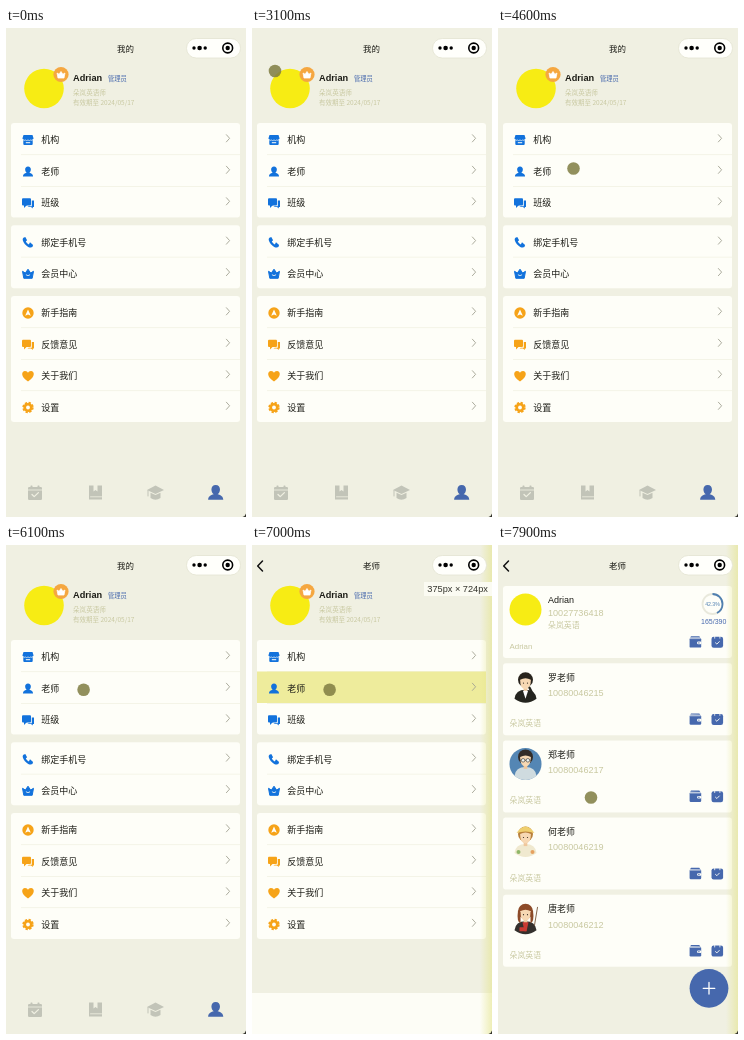
Write an HTML page that moves like this. It is 240 px wide and 489 px high and loops after 8000 ms.

```html
<!DOCTYPE html>
<html lang="zh-CN">
<head>
<meta charset="utf-8">
<title>我的</title>
<style>
html, body { margin: 0; width: 100%; height: 100%; overflow: hidden; background: #f0f0e2; }
svg { display: block; width: 100%; height: 100%; }
text { font-family: "Noto Sans CJK SC", "Noto Sans CJK", "Noto Sans", sans-serif; }
.latin { font-family: "Liberation Sans", Arial, sans-serif; }
</style>
</head>
<body>
<svg id="stage" viewBox="0 0 240 489"></svg>
<script>
const BG = '#f0f0e2', CARD = '#fefef8', INK = '#1c1c16', BLUE = '#4668ad';
const SKY = '#1272dc', ORANGE = '#f6a318', GREY = '#c2c4b8', PALE = '#c8c8a0', YELLOW = '#f7ec14';
const LOOP = 8000;

const text = (x, y, s, size, fill = INK, extra = '') =>
  `<text x="${x}" y="${y + size * 0.37}" font-size="${size}" fill="${fill}" ${extra}>${s}</text>`;
const rect = (x, y, w, h, fill, r = 0, extra = '') =>
  `<rect x="${x}" y="${y}" width="${w}" height="${h}" rx="${r}" fill="${fill}" ${extra}/>`;
const circle = (x, y, r, fill, extra = '') =>
  `<circle cx="${x}" cy="${y}" r="${r}" fill="${fill}" ${extra}/>`;
const path = (d, fill, extra = '') => `<path d="${d}" fill="${fill}" ${extra}/>`;
const line = (d, color, w = 1) =>
  path(d, 'none', `stroke="${color}" stroke-width="${w}" stroke-linecap="round" stroke-linejoin="round"`);
const at = (x, y, body, k = 1) => `<g transform="translate(${x} ${y}) scale(${k})">${body}</g>`;
const group = (id, body) => `<g id="${id}">${body}</g>`;
const LATIN = 'class="latin"', MID = 'text-anchor="middle"', BOLD = 'font-weight="500"';

// Icons are drawn around 0,0
const person = c => path('M0-5.5C2-5.5 3.1-4 3.1-2.2 3.1-.7 2.3.7 1.4 1.3 3.8 1.9 5.5 3 5.5 5.3H-5.5C-5.5 3-3.8 1.9-1.4 1.3-2.3.7-3.1-.7-3.1-2.2-3.1-4-2-5.5 0-5.5Z', c);
const crown = c => path('M-5.5-2.5-2.6-.8 0-4.6 2.6-.8 5.5-2.5 4.2 4.5H-4.2Z', c, `stroke="${c}" stroke-linejoin="round"`);
const icons = {
  shop: rect(-4.7, -2, 9.4, 7, SKY, 1) + path('M-4.5-5H4.5L5.6-1.4Q4.2 1 2.8-.6 1.4 1 0-.6-1.4 1-2.8-.6-4.2 1-5.6-1.4Z', SKY) +
    line('M-4.8-.2Q-3.6.9-2.7 0-1.4 1.1 0 0 1.4 1.1 2.7 0 3.8.9 4.8-.2', CARD, 0.7) + rect(-2.2, 2.2, 4.4, 1, CARD),
  person: at(0, 0, person(SKY), 0.92),
  chat: c => rect(-6, -4.8, 9, 7.4, c, 1) + path('M-4 2V5L-1 2Z', c) +
    path('M3.8-2.4H6V4H4.8V5.6L3 4H-.6L.8 3.2H3.8Z', c),
  phone: path('M-4.6-4.6-2.7-5.2-.9-2-2.2-.7Q-1.2 1.3.8 2.2L2-.1 5.1 2.8 4.4 4.8Q2.6 5.8.2 4.6-4 2.5-5.3-2.2-5.5-3.8-4.6-4.6Z', SKY),
  crown: crown(SKY) + line('M-1.8 1.2Q0 2.8 1.8 1.2', CARD, 0.8),
  guide: circle(0, 0, 5.7, ORANGE) + path('M0-3.4 2.8 2.8 0 1.4-2.8 2.8Z', CARD),
  heart: path('M0 5.5C-8 .3-6.4-5-3-5-1.3-5-.4-4 0-3.2.4-4 1.3-5 3-5 6.4-5 8 .3 0 5.5Z', ORANGE),
  gear: circle(0, 0, 4.6, ORANGE) + circle(0, 0, 4.8, 'none', `stroke="${ORANGE}" stroke-width="1.8" stroke-dasharray="2.3 1.47"`) + circle(0, 0, 1.9, CARD),
};
const calendar = rect(-7, -6, 14, 13, GREY, 1.2) + rect(-4.5, -7.5, 2, 3, GREY, 0.6) + rect(2.5, -7.5, 2, 3, GREY, 0.6) +
  line('M-7-3H7', BG, 0.8) + line('M-3 1.5-.8 3.6 3.4-.4', BG, 1.3);
const schedule = rect(-5.8, -5.2, 11.6, 11, BLUE, 2.2) + line('M-2.6-6V-3.8M2.6-6V-3.8', CARD, 0.8) +
  line('M-1.8 .8-.4 2.1 2-.4', CARD, 0.9);
const wallet = rect(-5.9, -4, 11.6, 9.6, BLUE, 1.2) + path('M-5.4-4.6-4.4-5.8H3.8L4.8-4.4Z', BLUE) +
  line('M-5.2-3.4H4.8', CARD, 0.6) + rect(1.6, -0.4, 4.3, 2.6, CARD, 1) + circle(3.4, 0.9, 0.7, BLUE);

const capsule = rect(180.5, 10.5, 54, 19.5, '#fffffb', 9.7, 'stroke="#e4e4d2" stroke-width=".8"') +
  circle(188, 20, 1.7, '#000') + circle(193.6, 20, 2.3, '#000') + circle(199.2, 20, 1.7, '#000') +
  circle(221.7, 20, 4.9, 'none', 'stroke="#000" stroke-width="1.6"') + circle(221.7, 20, 2.2, '#000');
const title = s => text(119.5, 20.5, s, 8.5, INK, `${MID} ${BOLD}`);

function menuCard(top, rows) {
  let out = rect(5, top, 229, rows.length * 31.5, CARD, 3);
  rows.forEach(([icon, label, pressId], i) => {
    const edge = top + i * 31.5, y = edge + 17;
    if (i) out += rect(15, edge, 219, 0.6, '#eeeedc');
    if (pressId) out += group(pressId, rect(5, edge, 229, 31.5, '#eeec9c'));
    out += at(22, y, icon) + text(35.3, y, label, 9, INK, BOLD) +
      line(`M220.4 ${y - 5.3}l3.2 3.6-3.2 3.6`, '#a3a393', 0.9);
  });
  return out;
}

function minePage() {
  const head = circle(38, 60.5, 19.8, YELLOW) + circle(55, 46.5, 7.6, '#f5a740') + at(55, 46.8, crown('#fff'), 0.72) +
    text(67, 50, 'Adrian', 9.2, INK, 'class="latin" font-weight="700"') +
    text(102, 50.3, '管理员', 6.3, BLUE) +
    text(67, 65, '朵岚英语师', 6.6, PALE) +
    text(67, 75, '有效期至 2024/05/17', 6.5, PALE);
  const cards = [
    [95, [[icons.shop, '机构'], [icons.person, '老师', 'press'], [icons.chat(SKY), '班级']]],
    [197.3, [[icons.phone, '绑定手机号'], [icons.crown, '会员中心']]],
    [268, [[icons.guide, '新手指南'], [icons.chat(ORANGE), '反馈意见'], [icons.heart, '关于我们'], [icons.gear, '设置']]],
  ];
  return head + cards.map(c => menuCard(...c)).join('');
}

const tabs = at(29, 465, calendar) +
  at(89.5, 464.5, path('M-6.5-7H-2V-1L0-2.5 2-1V-7H6.5V7H-6.5Z', GREY) + line('M-5 4.3H6', BG, 0.8)) +
  at(149.5, 464.5, path('M0-7 8.5-2.5 0 1.5-8.5-2.5Z', GREY) + path('M-5 .3 0 2.6 5 .3V5.5Q0 9-5 5.5Z', GREY) + line('M-7.5-2V3.5', GREY)) +
  at(209.7, 464.5, person(BLUE), 1.38);

// Simple portrait: backdrop, clothes, hair, skin and a few details
const portrait = (back, hair, clothes, detail) => circle(0, 0, 16, back) +
  path('M-11 12Q-10 3 0 3 10 3 11 12 0 20-11 12Z', clothes) + circle(0, -7, 7.5, hair) +
  rect(-1.8, 0, 3.6, 5, '#efc79c') + path('M-5.4-7Q0-10 5.4-7 5.4 2 0 2.5-5.4 2-5.4-7Z', '#f7d8b3') + detail;
const eyes = circle(-2, -3.6, 0.6, '#332a20') + circle(2, -3.6, 0.6, '#332a20');
const lens = x => circle(x, -3.6, 1.8, '#eef3ee', 'stroke="#333" stroke-width=".6"');
const faces = [
  circle(0, 0, 16, YELLOW),
  portrait('#fefef8', '#28231c', '#25251f', eyes + path('M-2.6 4H2.6L0 12Z', '#fff') + line('M8 9 4 1', '#25251f', 2.4)),
  portrait('#5486b4', '#332c28', '#cfdbdf', line('M-5-3.6H5', '#333', 0.6) + lens(-2.4) + lens(2.4)),
  portrait('#fefef8', '#b9803b', '#f0e9cf', eyes + path('M-9-8Q0-21 9-8 0-11-9-8Z', '#efcf6e') + circle(-7, 11, 2, '#8fb768') + circle(7, 11, 2, '#e6a160')),
  portrait('#fefef8', '#8d4b28', '#34302d', path('M-7.5-8Q-9 4-5 5V-6Z', '#8d4b28') + path('M7.5-8Q9 4 5 5V-6Z', '#8d4b28') + eyes +
    path('M-3 4H3L1 13H-1Z', '#c93a33') + rect(-6, 9, 7, 4, '#c93a33', 0.5) + line('M9 7 12-11', '#78553a', 0.9)),
];
const people = [
  ['Adrian', '10027736418'], ['罗老师', '10080046215'], ['郑老师', '10080046217'],
  ['何老师', '10080046219'], ['唐老师', '10080046212'],
];

function listPage() {
  const arc = 2 * Math.PI * 10;
  return people.map(([name, phone], i) => {
    const y = 41 + i * 77.2, first = !i;
    let out = rect(5, y, 229, 72, CARD, 3) + at(27.5, y + 23.5, faces[i]) +
      text(50, y + 14, name, 9, INK, first ? LATIN : BOLD) +
      text(50, y + (first ? 27 : 29.5), phone, 9.1, PALE, LATIN) +
      text(11.5, y + 60, first ? name : '朵岚英语', 7.9, PALE, first ? LATIN : '') +
      at(197.5, y + 56, wallet) + at(219.3, y + 56, schedule);
    if (first) {
      out += text(50, y + 39, '朵岚英语', 7.9, PALE) +
        circle(214.5, 59, 10, 'none', 'stroke="#e9e9dc" stroke-width="1.8"') +
        circle(214.5, 59, 10, 'none', `stroke="#4f7fb0" stroke-width="1.8" stroke-dasharray="${arc * 0.423} ${arc}" transform="rotate(-90 214.5 59)"`) +
        text(214.5, 59, '42.3%', 5.2, '#4f7fb0', `${LATIN} ${MID}`) +
        text(215.7, 76.8, '165/390', 7, BLUE, `${LATIN} ${MID}`);
    }
    return out;
  }).join('');
}

const stage = document.getElementById('stage');
stage.innerHTML = `<linearGradient id="fade"><stop stop-color="#e4e48c" stop-opacity="0"/><stop offset="1" stop-color="#e4e48c" stop-opacity=".6"/></linearGradient>` +
  rect(0, 0, 240, 489, BG) +
  group('mine', group('tabs', tabs) + group('foot', rect(0, 448, 240, 41, '#fdfdf6')) + minePage()) +
  group('list', listPage()) +
  group('edge', rect(228, 0, 12, 489, 'url(#fade)')) +
  group('fab', circle(211, 443.3, 19.4, BLUE) + line('M205.2 443.3H216.8M211 437.5V449.1', '#fff', 1.3)) +
  group('navMine', title('我的')) +
  group('navList', title('老师') + line('M10.5 16 5.7 21 10.5 26', '#111', 1.5)) + capsule +
  group('size', rect(172, 37, 68, 14, '#fbfbf2') + text(175.3, 44, '375px × 724px', 9.2, '#33332c', LATIN)) +
  path('M240 485.5V489H236.5Q239 488.5 240 485.5Z', '#33332c') +
  group('touch', circle(0, 0, 6.3, '#7f7c42', 'opacity=".85"')) +
  group('arrow', path('M0 0V9.2L2.1 7.3 3.6 10.8 5.1 10.1 3.6 6.8H6.5Z', '#111', 'stroke="#fff" stroke-width=".6"'));

// Visible from / until, in ms
const spans = {
  mine: [0, 7100], tabs: [0, 7000], foot: [7000, 7100], press: [6900, 7100],
  navMine: [0, 7000], navList: [7000, LOOP], size: [7000, 7700], edge: [7000, LOOP],
  fab: [7100, LOOP], list: [7500, LOOP], arrow: [7100, 7500],
};
const parts = Object.entries(spans).map(([id, span]) => [document.getElementById(id), span]);
const touch = document.getElementById('touch'), arrow = document.getElementById('arrow');

// Pointer stops: time, x, y
const stops = [
  [2600, 22, 20], [2900, 22, 20], [3100, 23, 43], [3300, 23, 43], [3700, 102, 50], [3900, 102, 50],
  [4500, 75.5, 140.5], [4800, 75.5, 140.5], [5000, 77.6, 144.7], [7500, 77.6, 144.7], [7800, 93, 252.5], [LOOP, 93, 252.5],
];

function pointer(t) {
  const i = Math.max(1, stops.findIndex(s => s[0] > t));
  const [t0, x0, y0] = stops[i - 1], [t1, x1, y1] = stops[i];
  const p = Math.max(0, (t - t0) / (t1 - t0)), e = p * p * (3 - 2 * p);
  return [x0 + (x1 - x0) * e, y0 + (y1 - y0) * e];
}

const start = performance.now();
function draw() {
  const t = (performance.now() - start) % LOOP;
  for (const [el, [from, to]] of parts) el.style.display = t >= from && t < to ? '' : 'none';
  const [x, y] = pointer(t);
  touch.style.display = t >= stops[0][0] && (t < 7100 || t >= 7500) ? '' : 'none';
  touch.setAttribute('transform', `translate(${x} ${y})`);
  arrow.setAttribute('transform', `translate(${x} ${y})`);
  requestAnimationFrame(draw);
}
draw();
</script>
</body>
</html>
```
